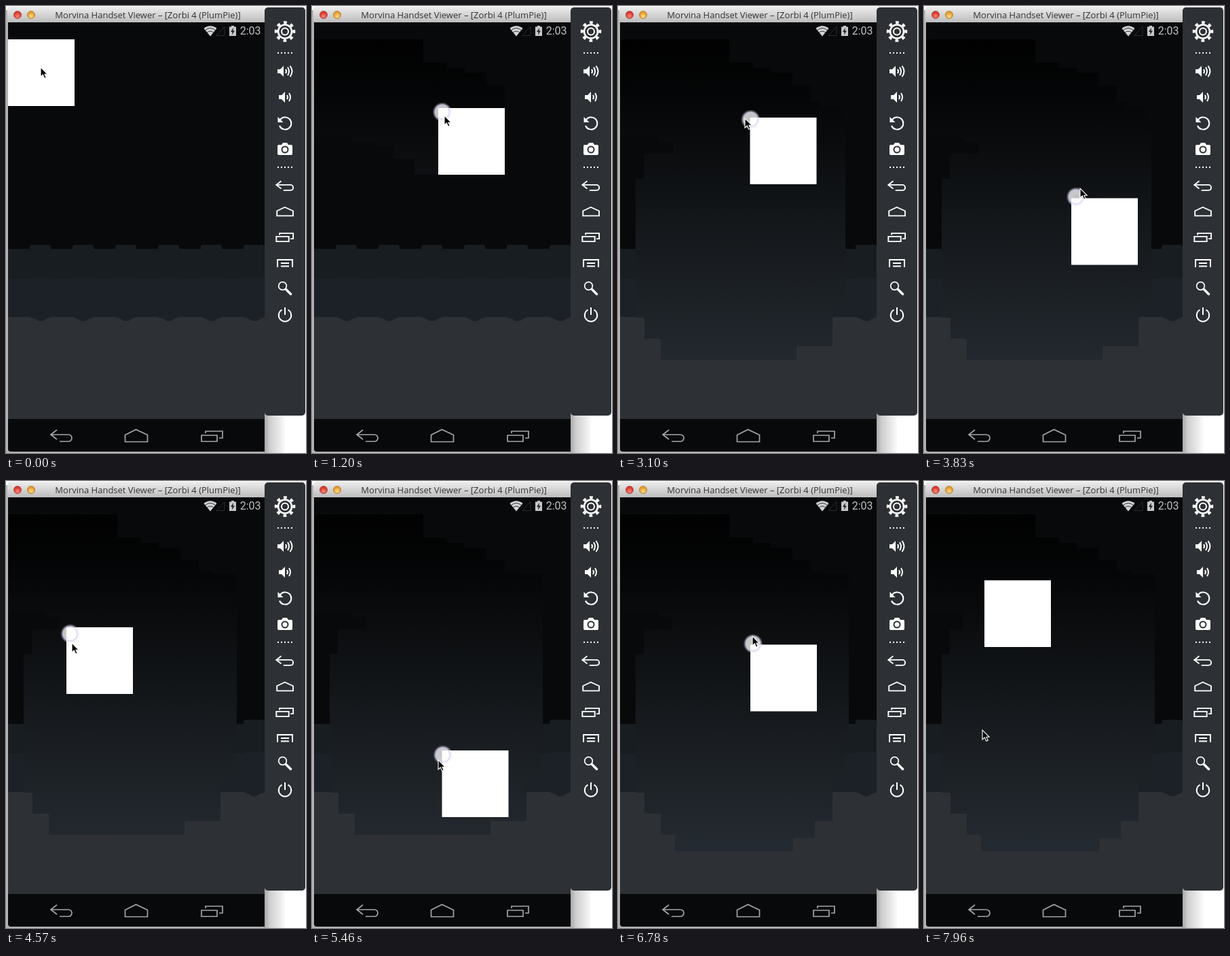
Recreate the animation shown at these times as an HTML page. Size 442x657 px, loop 8 s.

```html
<!DOCTYPE html>
<html lang="en">
<head>
<meta charset="utf-8">
<title>Dragging a box</title>
<style>
  html, body { margin: 0; width: 100%; height: 100%; overflow: hidden; background: #fff; }
  svg { display: block; width: 100%; height: 100%; }
  .line { fill: none; stroke-width: 2; }
  .title { font: 13px "Open Sans", "Noto Sans", sans-serif; fill: #333; text-anchor: middle; }
  .clock { font: 16px Roboto, sans-serif; fill: #bfc1c3; text-anchor: end; }
</style>
</head>
<body>
<svg viewBox="0 0 442 657">
  <defs>
    <linearGradient id="bar" x2="0" y2="1">
      <stop stop-color="#ededed"/><stop offset="1" stop-color="#bdbdbd"/>
    </linearGradient>
    <linearGradient id="shade">
      <stop stop-color="#a8a8a8"/><stop offset=".25" stop-color="#cecece"/>
      <stop offset=".7" stop-color="#e8e8e8"/><stop offset="1" stop-color="#fafafa"/>
    </linearGradient>
    <linearGradient id="sky" x2="0" y2="1">
      <stop stop-color="#000"/><stop offset=".2" stop-color="#050607"/>
      <stop offset=".6" stop-color="#181c20"/><stop offset="1" stop-color="#293038"/>
    </linearGradient>
    <radialGradient id="red" cy=".7"><stop stop-color="#ff8a7c"/><stop offset="1" stop-color="#d8382f"/></radialGradient>
    <radialGradient id="amber" cy=".7"><stop stop-color="#ffe08a"/><stop offset="1" stop-color="#e59a2c"/></radialGradient>
    <radialGradient id="glow">
      <stop stop-color="#fff" stop-opacity=".72"/><stop offset=".55" stop-color="#fff" stop-opacity=".78"/>
      <stop offset=".72" stop-color="#f4f2ff" stop-opacity=".75"/><stop offset="1" stop-color="#d8d4f0" stop-opacity="0"/>
    </radialGradient>
    <pattern id="bumps" x="35" y="351" width="63" height="6" patternUnits="userSpaceOnUse">
      <path d="M0 6V2L2 0H29L31 2V6Z" fill="#171d20"/>
    </pattern>
    <pattern id="ripples" x="35" y="398" width="63" height="3" patternUnits="userSpaceOnUse">
      <path d="M0 3V1H31V3Z" fill="#1c2128"/>
    </pattern>
    <pattern id="dips" x="35" y="457" width="63" height="7" patternUnits="userSpaceOnUse">
      <path d="M0 0C4 3 8 1 12 6H20C24 1 28 3 31 0Z" fill="#1c2128"/>
    </pattern>
    <clipPath id="swept"><path id="trail"/></clipPath>
    <path id="back" d="M10 1L1 8L10 15M1 8H27A5 5 0 0 1 27 18H14"/>
    <path id="home" d="M1 19V9L17 1L34 9V19Z"/>
    <path id="recents" d="M1 8H24V17H1ZM7 5V2H32V12H27"/>
    <path id="dots" d="M0 0H24" stroke-width="2" stroke-dasharray="2 3"/>
    <path id="speaker" d="M0 -3H4L9 -8V8L4 3H0Z" stroke="none"/>
  </defs>

  <rect y="6" width="386" height="651" fill="#b4b4b4"/>
  <rect x="381" y="590" width="30" height="67" fill="url(#shade)"/>
  <path d="M2 24V6Q2 1 7 1H382V24Z" fill="url(#bar)"/>
  <circle cx="17" cy="13" r="5.5" fill="url(#red)" stroke="#a33a32" stroke-width=".8"/>
  <circle cx="37" cy="13" r="5.5" fill="url(#amber)" stroke="#a8752c" stroke-width=".8"/>
  <text class="title" x="209" y="18">Morvina Handset Viewer – [Zorbi 4 (PlumPie)]</text>

  <path d="M3 24H381V655H7Q3 655 3 651Z" fill="#08090b"/>
  <rect x="3" y="357" width="378" height="44" fill="#171d20"/>
  <rect x="3" y="351" width="378" height="6" fill="url(#bumps)"/>
  <rect x="3" y="401" width="378" height="57" fill="#1c2128"/>
  <rect x="3" y="398" width="378" height="3" fill="url(#ripples)"/>
  <rect x="3" y="457" width="378" height="150" fill="#2d3034"/>
  <rect x="3" y="457" width="378" height="7" fill="url(#dips)"/>
  <rect x="3" y="24" width="378" height="583" fill="url(#sky)" clip-path="url(#swept)"/>

  <path d="M291.500 33Q301 25.500 310.500 33L301 44.500Z" fill="#d4d4d4"/>
  <path d="M293 36Q301 29 309 36M295.500 39.500Q301 34.500 306.500 39.500" fill="none" stroke="#2a2c2e"/>
  <path d="M310 43.500H322V30Z" fill="none" stroke="#2a2c2e"/>
  <path d="M329 30.500H332V29H336V30.500H339V44H329Z" fill="#c8c8c8"/>
  <path d="M335 32L331 38H333.500L333 42.500L337 36.500H334.500Z" fill="#222"/>
  <text class="clock" x="375.500" y="42">2:03</text>

  <g class="line" stroke="#a3a5a7" style="stroke-width:1.700">
    <use href="#back" x="65" y="622"/>
    <use href="#home" x="174.500" y="621.500"/>
    <use href="#recents" x="287" y="623"/>
  </g>

  <rect x="381" y="2" width="60" height="600" rx="5" fill="#2d3034"/>
  <g class="line" stroke="#fff">
    <g transform="translate(411 37.500)">
      <circle r="10" stroke-width="2.600"/>
      <circle r="13.300" stroke-width="4" stroke-dasharray="4.600 5.846" transform="rotate(-10)"/>
      <circle r="5"/>
    </g>
    <use href="#dots" x="400" y="69"/>
    <use href="#dots" x="400" y="237"/>
    <g transform="translate(400 96)">
      <use href="#speaker" fill="#fff"/>
      <path d="M12 -3Q14 0 12 3M15 -6Q19 0 15 6M18.500 -8Q24.500 0 18.500 8"/>
    </g>
    <g transform="translate(402 134)">
      <use href="#speaker" fill="#fff"/>
      <path d="M12 -3Q14 0 12 3M15 -6Q19 0 15 6"/>
    </g>
    <path d="M403.500 168A9 9 0 1 1 403 176"/>
    <path d="M400.500 163V171H408.500Z" fill="#fff" stroke="none"/>
    <path d="M402 204H406L408 201H414L416 204H420Q422 204 422 206V217Q422 219 420 219H402Q400 219 400 217V206Q400 204 402 204Z" fill="#fff" stroke="none"/>
    <circle cx="411" cy="211" r="4.500" stroke="#2d3034"/>
    <use href="#back" transform="translate(397.500 256.500) scale(.8)" stroke-width="2.400"/>
    <use href="#home" transform="translate(398.500 295) scale(.72 .7)" stroke-width="2.600"/>
    <use href="#recents" transform="translate(397.500 332.500) scale(.8)" stroke-width="2.400"/>
    <path d="M400 384V373H422V384M405 378H417M405 382.500H417"/>
    <circle cx="407.500" cy="411.500" r="5.800" stroke-width="1.700"/>
    <path d="M412.500 416.500L419.500 423.500" stroke-width="3.500" stroke-linecap="round"/>
    <path d="M406.500 446.500A9.200 9.200 0 1 0 415.500 446.500M411 443V454"/>
  </g>

  <rect id="box" width="98" height="98" fill="#fff"/>
  <g id="touch">
    <circle r="14.500" fill="url(#glow)"/>
    <circle r="10.500" fill="none" stroke="#cfcbea" stroke-opacity=".7" stroke-width="1.300"/>
  </g>
  <path id="cursor" d="M0 0V14L3.300 11L5.700 16.300L8.200 15.200L5.900 10.300H10.200Z" fill="#000" stroke="#fff" stroke-width="1.100"/>
</svg>

<script>
  const LOOP = 8000, START = 592, STEP = 147.1, REST = 600;
  const SIZE = 98, GLOW = 15;

  // Box corner at each step of the drag
  const path = [
    [66, 94], [101, 102], [127, 108], [159, 126], [186, 150], [200, 174], [163, 200], [96, 225],
    [50, 260], [35, 315], [47, 360], [69, 391], [118, 422], [165, 402], [218, 345], [237, 262],
    [232, 200], [194.5, 164], [158, 157], [110, 205], [118, 265], [164, 308], [217, 282.5], [242, 228],
    [207, 149], [150, 142], [107, 165], [89, 215], [100, 275], [140, 318], [180, 330], [199, 336],
    [201, 362], [191.5, 396], [160, 427], [112, 446], [94, 439], [98, 420], [120, 390], [158, 348],
    [196, 312], [213, 276], [195, 240.5], [190, 193], [146, 152], [118, 127], [96, 125], [87, 148]
  ];
  const home = [3, 49], parked = [89, 146];
  const leaving = [[57, 220], [64, 315], [86, 366]];
  const LAST = path.length + leaving.length - 1;

  function pose(step) {
    if (step < 0) return { box: home, cursor: [51, 90] };
    if (step >= path.length) return { box: parked, cursor: leaving[step - path.length] };
    const box = path[step], next = path[step + 1] || parked;
    const ahead = k => box.map((v, i) => v + [4.5, 3.5][i] + k * (next[i] - v));
    return { box, touch: ahead(0.1), cursor: ahead(0.33) };
  }

  function bounds({ box: [x, y], touch, cursor: [cx, cy] }) {
    const [tx, ty] = touch || [x + GLOW, y + GLOW];
    return [
      Math.min(x, cx, tx - GLOW), Math.min(y, cy, ty - GLOW),
      Math.max(x + SIZE, cx + 11), Math.max(y + SIZE, cy + 17)
    ].map(Math.round);
  }

  // Each step repaints the rectangle spanning its old and new poses
  const repaints = [];
  for (let i = 0; i <= LAST; i++) {
    const a = bounds(pose(i - 1)), b = bounds(pose(i));
    const [l, t] = [0, 1].map(k => Math.min(a[k], b[k]));
    const [r, d] = [2, 3].map(k => Math.max(a[k], b[k]));
    repaints.push(`M${l} ${t}H${r}V${d}H${l}Z`);
  }

  const $ = id => document.getElementById(id);
  const place = (id, [x, y]) => $(id).setAttribute('transform', `translate(${x} ${y})`);
  const origin = performance.now();
  let shown;

  function draw() {
    const t = (performance.now() - origin) % LOOP;
    const step = t < REST ? -1 : Math.min(LAST, Math.floor((t - START) / STEP));
    if (step !== shown) {
      shown = step;
      const { box, touch, cursor } = pose(step);
      $('trail').setAttribute('d', repaints.slice(0, step + 1).join('') || 'M0 0');
      place('box', box);
      place('cursor', cursor.map(Math.round));
      $('touch').style.display = touch ? '' : 'none';
      if (touch) place('touch', touch);
    }
    requestAnimationFrame(draw);
  }
  draw();
</script>
</body>
</html>
```
